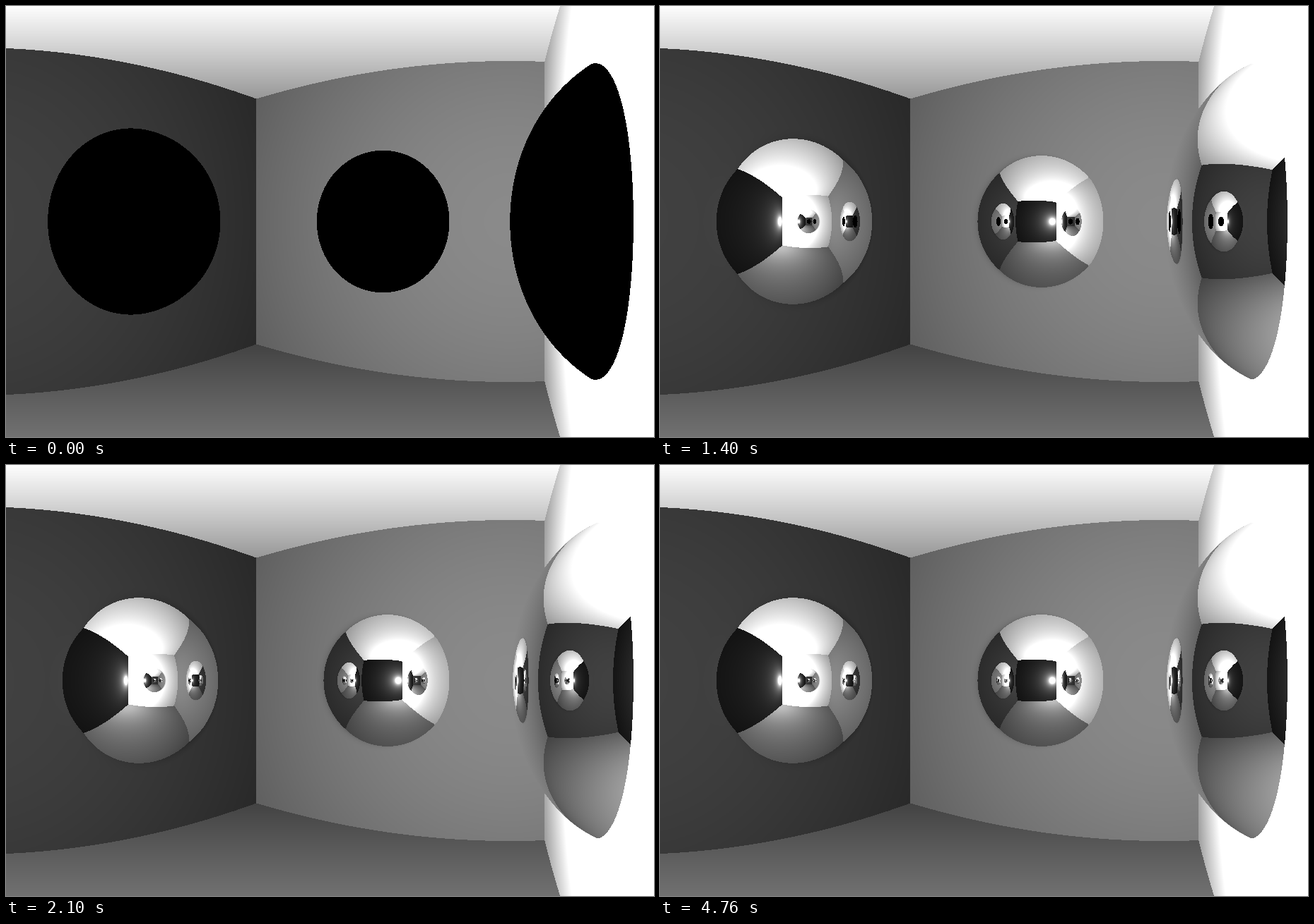
These frames come from a looping animation (917 by 611 pixels, 5.6 s). An HTML page with a canvas:

```html
<!DOCTYPE html>
<html lang="en">
<head>
<meta charset="utf-8">
<title>Mirror room</title>
<style>
  html, body { margin: 0; width: 100%; height: 100%; overflow: hidden; background: #000; }
  canvas { display: block; width: 917px; height: 611px; }
</style>
</head>
<body>
<canvas id="view" width="917" height="611"></canvas>
<script>
const W = 917, H = 611;
const STEP = 700, LOOP = 5600, MAX_BOUNCES = 5;
const SCALE = W / (0.6 * Math.PI);   // pixels per radian
const HEADING = -Math.PI / 6;

// Unit-cube room; the lamp sits at the eye.
const EYE = [0.9, 0.01, 0.5];
const RADIUS = 0.3;
const BALLS = [[-0.1, 0.5, 0.5], [0.5, 1.2, 0.5], [1.2, 0.5, 0.5]];
// Brightness of the [low, high] wall on each axis.
const WALLS = [[59, 176], [19, 137], [96, 216]];

const ctx = document.getElementById('view').getContext('2d');
const image = ctx.createImageData(W, H);
const pixels = new Uint32Array(image.data.buffer);
const shade = new Uint8Array(W * H);
const bounces = new Uint8Array(W * H);

function hitBall(p, d, c) {
  const x = p[0] - c[0], y = p[1] - c[1], z = p[2] - c[2];
  const b = x * d[0] + y * d[1] + z * d[2];
  const disc = b * b - (x * x + y * y + z * z) + RADIUS * RADIUS;
  if (disc < 0) return Infinity;
  const t = -b - Math.sqrt(disc);
  return t > 0 ? t : Infinity;
}

function advance(p, d, t) {
  for (let i = 0; i < 3; i++) p[i] += d[i] * t;
}

function reflect(p, d, c) {
  let dot = 0;
  for (let i = 0; i < 3; i++) dot += d[i] * (p[i] - c[i]);
  const k = 2 * dot / (RADIUS * RADIUS);
  for (let i = 0; i < 3; i++) d[i] -= k * (p[i] - c[i]);
}

function trace(index, p, d) {
  let last = -1;
  for (let n = 0; n <= MAX_BOUNCES; n++) {
    let near = Infinity, level = 0, ball = -1;
    for (let i = 0; i < 3; i++) {
      if (d[i] === 0) continue;
      const side = d[i] > 0 ? 1 : 0;
      const t = (side - p[i]) / d[i];
      if (t < near) { near = t; level = WALLS[i][side]; }
    }
    for (let i = 0; i < 3; i++) {
      if (i === last) continue;
      const t = hitBall(p, d, BALLS[i]);
      if (t < near) { near = t; ball = i; }
    }
    advance(p, d, near);
    if (ball < 0) {
      const dist = Math.hypot(p[0] - EYE[0], p[1] - EYE[1], p[2] - EYE[2]);
      shade[index] = Math.min(255, level / dist);
      bounces[index] = n;
      return;
    }
    reflect(p, d, BALLS[ball]);
    last = ball;
  }
  bounces[index] = MAX_BOUNCES + 1;
}

function render() {
  for (let y = 0; y < H; y++) {
    const pitch = (H / 2 - y - 0.5) / SCALE;
    const flat = Math.cos(pitch), rise = Math.sin(pitch);
    for (let x = 0; x < W; x++) {
      const yaw = (x + 0.5 - W / 2) / SCALE + HEADING;
      trace(y * W + x, EYE.slice(), [Math.sin(yaw) * flat, Math.cos(yaw) * flat, rise]);
    }
  }
}

function paint(depth) {
  for (let i = 0; i < pixels.length; i++) {
    const v = bounces[i] > depth ? 0 : shade[i];
    pixels[i] = (0xff000000 | v * 0x010101) >>> 0;
  }
  ctx.putImageData(image, 0, 0);
}

let shown = -1;

function update() {
  const time = (performance.now() - start) % LOOP;
  const depth = Math.min(MAX_BOUNCES, Math.floor(time / STEP));
  if (depth !== shown) paint(shown = depth);
  requestAnimationFrame(update);
}

render();
const start = performance.now();
update();
</script>
</body>
</html>
```
